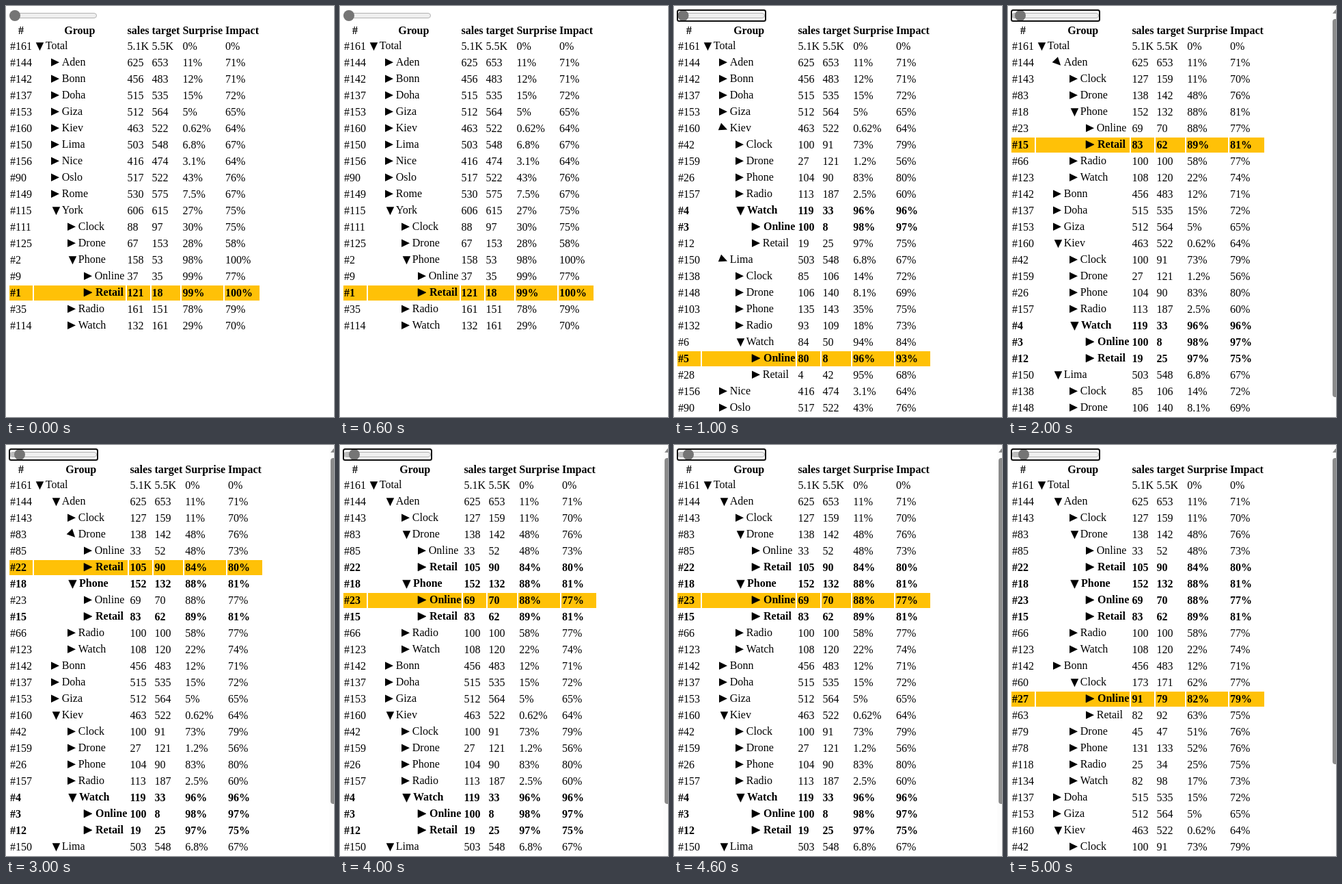
Animation, 480 px wide and 600 px high, one loop 6 s. Source, as an HTML page:

```html
<!DOCTYPE html>
<html lang="en">
<head>
<meta charset="utf-8">
<title>Sales tree</title>
<style>
html, body { margin: 0; width: 100%; height: 100%; overflow: hidden; background: #fff; }
svg { display: block; width: 480px; height: 600px; }
text { font: 16px "Liberation Serif", "Times New Roman", serif; }
.b { font-weight: bold; }
</style>
</head>
<body>
<svg id="stage" viewBox="0 0 480 600"></svg>
<script>
const svg = document.getElementById('stage');
const STEP = 1000, ROW = 24, TOP = 48, ROWS = 23;

// Indent gives the depth; then rank, sales, target, surprise, impact.
const tree = `Total 161 5.1K 5.5K 0 0
 Aden 144 625 653 11 71
  Clock 143 127 159 11 70
  Drone 83 138 142 48 76
   Online 85 33 52 48 73
   Retail 22 105 90 84 80
  Phone 18 152 132 88 81
   Online 23 69 70 88 77
   Retail 15 83 62 89 81
  Radio 66 100 100 58 77
  Watch 123 108 120 22 74
 Bonn 142 456 483 12 71
  Clock 60 173 171 62 77
   Online 27 91 79 82 79
   Retail 63 82 92 63 75
  Drone 79 45 47 51 76
  Phone 78 131 133 52 76
  Radio 118 25 34 25 75
  Watch 134 82 98 17 73
 Doha 137 515 535 15 72
 Giza 153 512 564 5 65
 Kiev 160 463 522 0.62 64
  Clock 42 100 91 73 79
  Drone 159 27 121 1.2 56
  Phone 26 104 90 83 80
  Radio 157 113 187 2.5 60
  Watch 4 119 33 96 96
   Online 3 100 8 98 97
   Retail 12 19 25 97 75
 Lima 150 503 548 6.8 67
  Clock 138 85 106 14 72
  Drone 148 106 140 8.1 69
  Phone 103 135 143 35 75
  Radio 132 93 109 18 73
  Watch 6 84 50 94 84
   Online 5 80 8 96 93
   Retail 28 4 42 95 68
 Nice 156 416 474 3.1 64
 Oslo 90 517 522 43 76
 Rome 149 530 575 7.5 67
 York 115 606 615 27 75
  Clock 111 88 97 30 75
  Drone 125 67 153 28 58
  Phone 2 158 53 98 100
   Online 9 37 35 99 77
   Retail 1 121 18 99 100
  Radio 35 161 151 78 79
  Watch 114 132 161 29 70`.split('\n').map(line => {
  const [name, rank, sales, target, surprise, impact] = line.trim().split(' ');
  return {
    name, rank, level: line.search(/\S/),
    values: [sales, target, surprise + '%', impact + '%']
  };
});

// Ranks that are open, bold or mid-turn; "hit" is the highlighted row.
const states = [
  { open: '161 115 2', bold: '', hit: '1', knob: 13 },
  { open: '161 160 4 150 6', bold: '4 3', hit: '5', knob: 13.5, turning: '160 150', angle: 22 },
  { open: '161 144 18 160 4 150', bold: '4 3 12', hit: '15', knob: 18, turning: '144', angle: 46, bar: 571 },
  { open: '161 144 83 18 160 4 150', bold: '18 15 4 3 12', hit: '22', knob: 20, turning: '83', angle: 46, bar: 524 },
  { open: '161 144 83 18 160 4 150', bold: '22 18 15 4 3 12', hit: '23', knob: 21, bar: 524 },
  { open: '161 144 83 18 142 60 160 4', bold: '22 18 23 15', hit: '27', knob: 23, turning: '142', angle: 0, bar: 466 }
];

const has = (list, rank) => (list || '').split(' ').includes(rank);

const rect = (x, y, w, h, fill, more = '') =>
  `<rect x="${x}" y="${y}" width="${w}" height="${h}" fill="${fill}" ${more}/>`;

const text = (x, y, str, bold, anchor = 'start') =>
  `<text x="${x}" y="${y}" text-anchor="${anchor}"${bold ? ' class="b"' : ''}>${str}</text>`;

function columns(shift) {
  const edges = [[5, 39], [41, 174.5 + shift]];
  let x = 176.5 + shift;
  for (const w of [34, 42.9, 60.7, 50.9]) {
    edges.push([x, x + w]);
    x += w + 2;
  }
  return edges;
}

function visibleRows(open) {
  const rows = [];
  let limit = 0;
  for (const node of tree) {
    if (node.level > limit) continue;
    rows.push(node);
    limit = node.level + (has(open, node.rank) ? 1 : 0);
  }
  return rows.slice(0, ROWS);
}

function slider(state, focused) {
  const ring = '<rect x="5" y="6" width="129" height="16" rx="2.5" fill="none" stroke="#101010" stroke-width="2"/>';
  return rect(5.5, 10.5, 127, 7, '#efefef', 'rx="3.5" stroke="#b2b2b2"') +
    rect(6, 11, state.knob - 6, 6, '#bdbdbd', 'rx="3"') +
    `<circle cx="${state.knob}" cy="14" r="8" fill="#757575"/>` +
    (focused ? ring : '');
}

function scrollbar(end) {
  return rect(473, 0, 7, 600, '#fcfcfc') +
    '<path d="M475 11L479.5 5L484 11Z" fill="#8b8b8b"/>' +
    rect(475, 19, 9, end - 19, '#8b8b8b', 'rx="4"');
}

function arrow(level, top, angle, bold) {
  const outline = bold ? ' stroke="#000" stroke-width=".6"' : '';
  return `<path d="M-6.2 -7V4.5L5.8 -1.25Z"${outline} transform="translate(${48.2 + 24 * level} ${top + 11.5}) rotate(${angle})"/>`;
}

function row(node, i, state, cols) {
  const top = TOP + ROW * i;
  const hit = node.rank === state.hit;
  const bold = hit || has(state.bold, node.rank);
  const angle = has(state.turning, node.rank) ? state.angle : has(state.open, node.rank) ? 90 : 0;
  let out = '';
  if (hit) {
    for (const [a, b] of cols) {
      const x = Math.round(a);
      out += rect(x, top, Math.round(b) - x, 22, '#ffc107');
    }
  }
  out += text(6, top + 16, '#' + node.rank, bold);
  out += arrow(node.level, top, angle, bold);
  out += text(57.8 + 24 * node.level + (bold ? 1.2 : 0), top + 15, node.name, bold);
  node.values.forEach((v, k) => { out += text(cols[k + 2][0] + 1, top + 16, v, bold); });
  return out;
}

function draw(index) {
  const state = states[index];
  const cols = columns(index ? 3.9 : 0);
  let out = slider(state, index > 0);
  ['#', 'Group', 'sales', 'target', 'Surprise', 'Impact'].forEach((label, k) => {
    out += text((cols[k][0] + cols[k][1]) / 2, 41, label, true, 'middle');
  });
  visibleRows(state.open).forEach((node, i) => { out += row(node, i, state, cols); });
  if (state.bar) out += scrollbar(state.bar);
  svg.innerHTML = out;
}

let shown = -1;
const start = performance.now();
function tick() {
  const index = Math.floor((performance.now() - start) / STEP) % states.length;
  if (index !== shown) draw(shown = index);
  requestAnimationFrame(tick);
}
tick();
</script>
</body>
</html>
```
